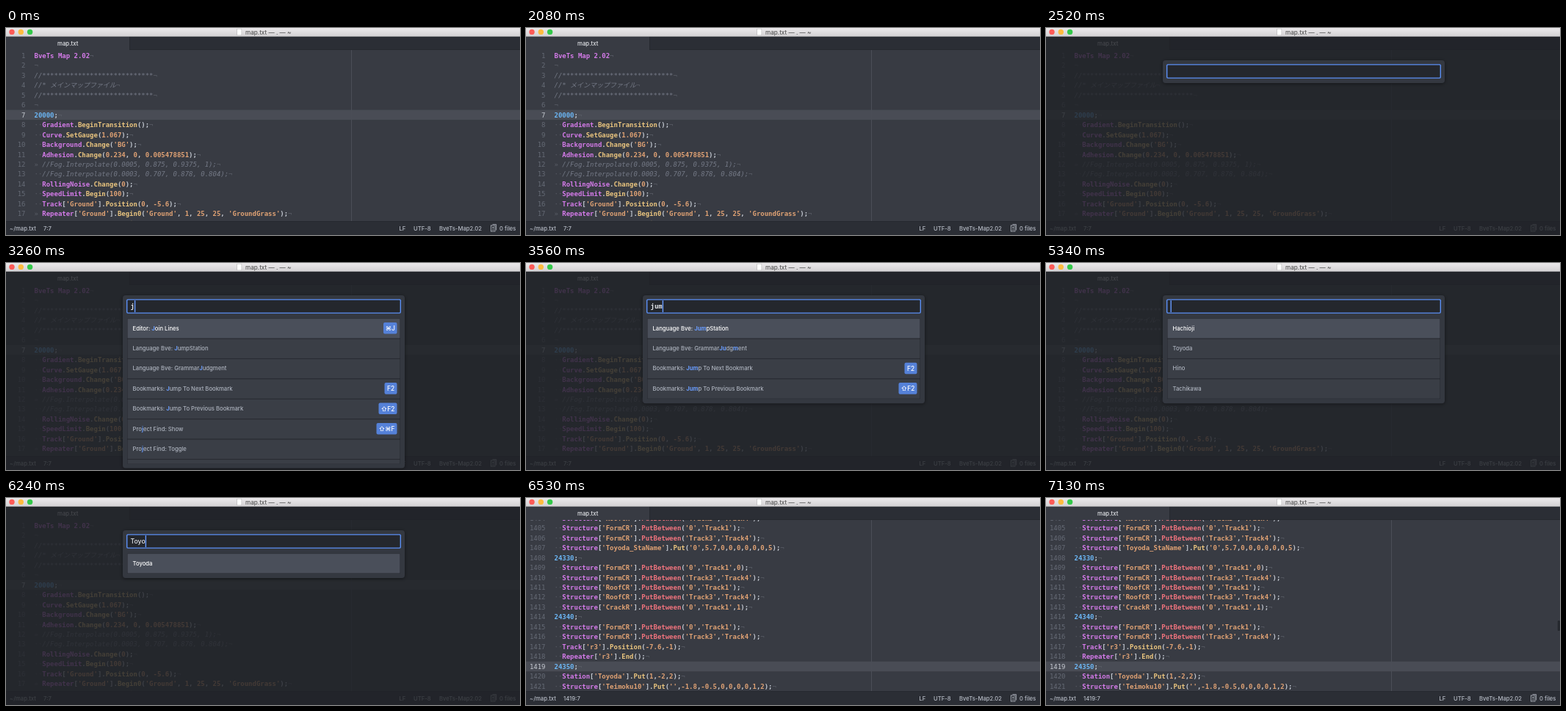
Animation of 700x282 px, one loop 9.23 s. Source, as an HTML page with a canvas:

```html
<!DOCTYPE html>
<html lang="en">
<head>
<meta charset="utf-8">
<title>Editor: jump to station</title>
<style>
  html, body { margin: 0; width: 100%; height: 100%; overflow: hidden; background: #383b43; }
  canvas { display: block; width: 700px; height: 282px; }
</style>
</head>
<body>
<canvas id="stage"></canvas>
<script>
const W = 700, H = 282, LOOP = 9230;
const canvas = document.getElementById('stage');
const ctx = canvas.getContext('2d');
const ratio = window.devicePixelRatio || 1;
canvas.width = W * ratio;
canvas.height = H * ratio;

const MONO = '"DejaVu Sans Mono", "Noto Sans CJK JP", "Noto Sans CJK", monospace';
const SANS = 'Inter, "DejaVu Sans", sans-serif';
const CODE_SIZE = 8.97, CHAR = 5.4, LINE = 13.47, CODE_X = 38.5;
const EDITOR_TOP = 30, EDITOR_BOTTOM = 263;
const ROW = 27.4, LIST_TOP = 75.6, LIST_MAX = 273.5;

const C = {
  editor: '#383b43', chrome: '#2b2e35', line: '#494c55', guide: '#4b4e57',
  gutter: '#656a75', faint: '#595d67', comment: '#747986', plain: '#c3c8d1',
  keyword: '#d57bea', method: '#eac57f', between: '#f0737d', value: '#e0a274',
  distance: '#6cb8f8', accent: '#5b8ff5'
};

const START = {
  first: 1, y: 37.6, active: 7, pos: '7:7',
  lines: [
    'BveTs Map 2.02', '',
    '//' + '*'.repeat(28), '//* メインマップファイル', '//' + '*'.repeat(28),
    '', '20000;',
    '  Gradient.BeginTransition();',
    '  Curve.SetGauge(1.067);',
    "  Background.Change('BG');",
    '  Adhesion.Change(0.234, 0, 0.005478851);',
    '» //Fog.Interpolate(0.0005, 0.875, 0.9375, 1);',
    '  //Fog.Interpolate(0.0003, 0.707, 0.878, 0.804);',
    '  RollingNoise.Change(0);',
    '  SpeedLimit.Begin(100);',
    "  Track['Ground'].Position(0, -5.6);",
    "» Repeater['Ground'].Begin0('Ground', 1, 25, 25, 'GroundGrass');",
    "  Repeater['Track0'].Begin0('0', 0, 0, 0, 22, 5, 5, 'SW');"
  ]
};

const between = (key, args) => `  Structure['${key}'].PutBetween(${args});`;
const FORM = [between('FormCR', "'0','Track1'"), between('FormCR', "'Track3','Track4'")];
const STATION = {
  first: 1404, y: 27.5, active: 1419, pos: '1419:7',
  lines: [
    between('RoofCR', "'Track3','Track4'"),
    ...FORM,
    "  Structure['Toyoda_StaName'].Put('0',5.7,0,0,0,0,0,0,5);",
    '24330;',
    between('FormCR', "'0','Track1',0"), FORM[1],
    between('RoofCR', "'0','Track1'"), between('RoofCR', "'Track3','Track4'"),
    between('CrackR', "'0','Track1',1"),
    '24340;',
    ...FORM,
    "  Track['r3'].Position(-7.6,-1);",
    "  Repeater['r3'].End();",
    '24350;',
    "  Station['Toyoda'].Put(1,-2,2);",
    "  Structure['Teimoku10'].Put('',-1.8,-0.5,0,0,0,0,1,2);"
  ]
};

const JUMP = ['Language Bve: JumpStation'];
const JUDGE = ['Language Bve: GrammarJudgment'];
const NEXT = ['Bookmarks: Jump To Next Bookmark', 'F2'];
const PREV = ['Bookmarks: Jump To Previous Bookmark', '⇧F2'];
const ALL = [
  ['Application: About'], ['Application: Add Project Folder'],
  ['Application: Bring All Windows To Front'], ['Application: Hide', '⌘H'],
  ['Application: Hide Other Applications', '⌥⌘H'],
  ['Application: Install Update'], ['Application: Minimize', '⌘M'], ['Application: New File', '⌘N']
];
const WITH_J = [
  ['Editor: Join Lines', '⌘J'], JUMP, JUDGE, NEXT, PREV,
  ['Project Find: Show', '⇧⌘F'], ['Project Find: Toggle'], ['Project Find: Show In Current Directory']
];
const STOPS = [['Hachioji'], ['Toyoda'], ['Hino'], ['Tachikawa']];

// Each step: start time, typed text, rows, cursor shown, station picker
const STEPS = [
  [2520, '', [], false],
  [2670, '', ALL, false],
  [2820, '', ALL, true],
  [3260, 'j', WITH_J, true],
  [3410, 'ju', [JUMP, JUDGE, NEXT, PREV], true],
  [3560, 'jum', [JUMP, JUDGE, NEXT, PREV], true],
  [3710, 'jump', [JUMP, NEXT, PREV], true],
  [4010, 'jumps', [JUMP, PREV], true],
  [4450, 'jumps', [JUMP, PREV], false],
  [4600, '', STOPS, true, true],
  [4890, '', STOPS, false, true],
  [5340, '', STOPS, true, true],
  [5790, 'T', [STOPS[1], STOPS[3]], true, true],
  [5940, 'To', [STOPS[1]], true, true],
  [6090, 'Toy', [STOPS[1]], true, true],
  [6240, 'Toyo', [STOPS[1]], true, true]
];
const CLOSE = 6530, THUMB = 7130;
const BLINKS = [[150, 440], [890, 1340], [1630, 2080]];

function rect(x, y, w, h, fill) {
  ctx.fillStyle = fill;
  ctx.fillRect(x, y, w, h);
}

function round(x, y, w, h, r, fill) {
  ctx.beginPath();
  ctx.roundRect(x, y, w, h, r);
  ctx.fillStyle = fill;
  ctx.fill();
}

// Draws text centred vertically on y and returns its width
function text(str, x, y, size, color, { weight = 400, family = SANS, align = 'left', style = '' } = {}) {
  ctx.font = `${style} ${weight} ${size}px ${family}`;
  ctx.textAlign = align;
  ctx.fillStyle = color;
  ctx.fillText(str, x, y + size * 0.36);
  return ctx.measureText(str).width;
}

function code(str, x, y, color, style = '', weight = 700) {
  return text(str, x, y, CODE_SIZE, color, { weight, family: MONO, style });
}

function tokens(line) {
  if (/^\d+;$/.test(line)) return [[line.slice(0, -1), C.distance], [';', C.plain]];
  if (line.startsWith('BveTs')) return [[line, C.keyword]];
  let prev = '';
  return (line.match(/'[^']*'|-?\d[\d.]*|\w+|\s+|./g) || []).map(part => {
    let color = C.plain;
    if (/^['\d]|^-\d/.test(part)) color = C.value;
    else if (/^\w/.test(part)) {
      color = prev !== '.' ? C.keyword : part === 'PutBetween' ? C.between : C.method;
    }
    prev = part;
    return [part, color];
  });
}

function drawLine(line, y) {
  let x = CODE_X;
  const indent = line.match(/^(  |» )?/)[0];
  const body = line.slice(indent.length);
  if (indent) code(indent[0] === '»' ? '»' : '··', x, y, C.faint, '', 400);
  x += indent.length * CHAR;
  if (body.startsWith('//')) {
    x += code(body, x, y, C.comment, 'italic', 400);
  } else {
    for (const [part, color] of tokens(body)) x += code(part, x, y, color);
  }
  code('¬', x, y, C.faint, '', 400);
}

function drawEditor(doc) {
  rect(0, 11, W, H - 11, C.editor);
  ctx.save();
  ctx.beginPath();
  ctx.rect(0, EDITOR_TOP, W, EDITOR_BOTTOM - EDITOR_TOP);
  ctx.clip();
  const activeY = doc.y + (doc.active - doc.first) * LINE;
  rect(0, activeY - 6.8, W, LINE, C.line);
  rect(470, EDITOR_TOP, 1, H, C.guide);
  doc.lines.forEach((line, i) => {
    const y = doc.y + i * LINE, n = doc.first + i;
    text(String(n), 26.5, y, CODE_SIZE, n === doc.active ? '#c5c9d1' : C.gutter,
      { family: MONO, align: 'right' });
    drawLine(line, y);
  });
  ctx.restore();
}

function drawChrome(doc) {
  rect(168, 11, W - 168, 19, C.chrome);
  rect(168, 29.3, W - 168, 0.7, '#24272d');
  rect(168, 12, 0.7, 18, '#24272d');
  text('map.txt', 70, 21.5, 7.8, '#e4e6ea', { weight: 500 });

  rect(0, EDITOR_BOTTOM, W, H - EDITOR_BOTTOM, C.chrome);
  rect(0, EDITOR_BOTTOM, W, 0.7, '#24272d');
  const label = (s, x) => text(s, x, 273, 7.7, '#b7bcc6', { weight: 500 });
  label('~/map.txt', 5);
  label(doc.pos, 51);
  label('LF', 535.5);
  label('UTF-8', 555);
  label('BveTs-Map2.02', 590);
  label('0 files', 672);
  ctx.strokeStyle = '#b7bcc6';
  ctx.lineWidth = 0.8;
  ctx.strokeRect(660.5, 269, 5.5, 8);
  ctx.beginPath();
  ctx.moveTo(662.5, 267.6);
  ctx.lineTo(667.6, 267.6);
  ctx.lineTo(667.6, 275.5);
  ctx.moveTo(662, 272);
  ctx.lineTo(664.6, 272);
  ctx.moveTo(663.3, 270.7);
  ctx.lineTo(663.3, 273.3);
  ctx.moveTo(662, 275);
  ctx.lineTo(664.6, 275);
  ctx.stroke();
}

function drawTitle() {
  const shade = ctx.createLinearGradient(0, 0, 0, 11.5);
  shade.addColorStop(0, '#ebe9eb');
  shade.addColorStop(1, '#d3d1d3');
  rect(0, 0, W, 11.5, shade);
  rect(0, 11.2, W, 0.6, '#a9a8aa');
  ['#fc5b57', '#fdbc40', '#34c84a'].forEach((color, i) => {
    ctx.beginPath();
    ctx.arc(8 + i * 12.3, 5.4, 3.7, 0, Math.PI * 2);
    ctx.fillStyle = color;
    ctx.fill();
  });
  rect(314.5, 1, 6.6, 9, '#b0b0b0');
  rect(315, 1.4, 5.6, 8.2, '#ffffff');
  text('map.txt — . — ~', 326, 5.6, 8.2, '#454545');
}

// Indexes of the typed letters, found in order inside the label
function matches(label, query) {
  const found = new Set();
  let from = 0;
  for (const ch of query) {
    const at = label.toLowerCase().indexOf(ch, from);
    if (at < 0) break;
    found.add(at);
    from = at + 1;
  }
  return found;
}

function drawLabel(label, query, y, color) {
  const hits = matches(label, query);
  let x = 172.5, i = 0;
  while (i < label.length) {
    let end = i + 1;
    while (end < label.length && hits.has(end) === hits.has(i)) end++;
    const hit = hits.has(i);
    x += text(label.slice(i, end), x, y, 7.7, hit ? '#6a9dff' : color, { weight: hit ? 700 : 500 });
    i = end;
  }
}

function drawKeys(keys, y) {
  const w = keys.length === 3 ? 28 : keys === 'F2' ? 17 : keys.length === 2 ? 18.5 : 25;
  const width = keys === '⇧F2' ? 25 : w;
  round(532.5 - width, y - 8, width, 15.6, 2, '#5581d8');
  text(keys, 532.5 - width / 2, y, 8.4, '#ffffff', { weight: 500, align: 'center' });
}

function drawPanel([, typed, rows, cursor, picker]) {
  const listEnd = Math.min(LIST_TOP + rows.length * ROW, LIST_MAX);
  const end = rows.length ? listEnd + 6 : 75;
  ctx.save();
  ctx.shadowColor = 'rgba(0,0,0,.45)';
  ctx.shadowBlur = 5 * ratio;
  ctx.shadowOffsetY = ratio;
  round(159, 44, 384, end - 44, 4, '#343840');
  ctx.restore();

  round(164, 49.2, 374, 19.6, 2, C.accent);
  round(165.4, 50.6, 371.2, 16.8, 1, '#24272d');
  const font = picker ? { weight: 500 } : { weight: 700, family: MONO };
  const width = text(typed, 169.5, 59, picker ? 8.7 : CODE_SIZE, '#e3e6eb', font);
  if (cursor) rect(169.5 + width, 51, 1.4, 16, '#6699ff');

  ctx.save();
  ctx.beginPath();
  ctx.rect(165, LIST_TOP, 372, listEnd - LIST_TOP);
  ctx.clip();
  rows.forEach(([label, keys], i) => {
    const top = LIST_TOP + i * ROW, y = top + 13.3;
    rect(165, top, 372, ROW, '#24272d');
    rect(165.5, top + 0.5, 371, ROW - 1, i ? '#3a3e46' : '#4a4f5a');
    drawLabel(label, picker ? '' : typed, y, i ? '#adb3be' : '#ffffff');
    if (keys) drawKeys(keys, y);
  });
  ctx.restore();
}

function draw(t) {
  ctx.setTransform(ratio, 0, 0, ratio, 0, 0);
  const doc = t < CLOSE ? START : STATION;
  drawEditor(doc);
  drawChrome(doc);
  if (BLINKS.some(([on, off]) => t >= on && t < off)) rect(71, 111.5, 1.4, 14, '#6699ff');
  if (t >= THUMB) round(696.8, 167, 3.2, 14, 1, '#25282e');

  const step = t < CLOSE && STEPS.filter(s => s[0] <= t).pop();
  if (step) {
    rect(0, 11, W, H - 11, 'rgba(32,35,40,.82)');
    drawPanel(step);
  }
  drawTitle();
}

const begin = performance.now();
function tick() {
  draw((performance.now() - begin) % LOOP);
  requestAnimationFrame(tick);
}
tick();
</script>
</body>
</html>
```
